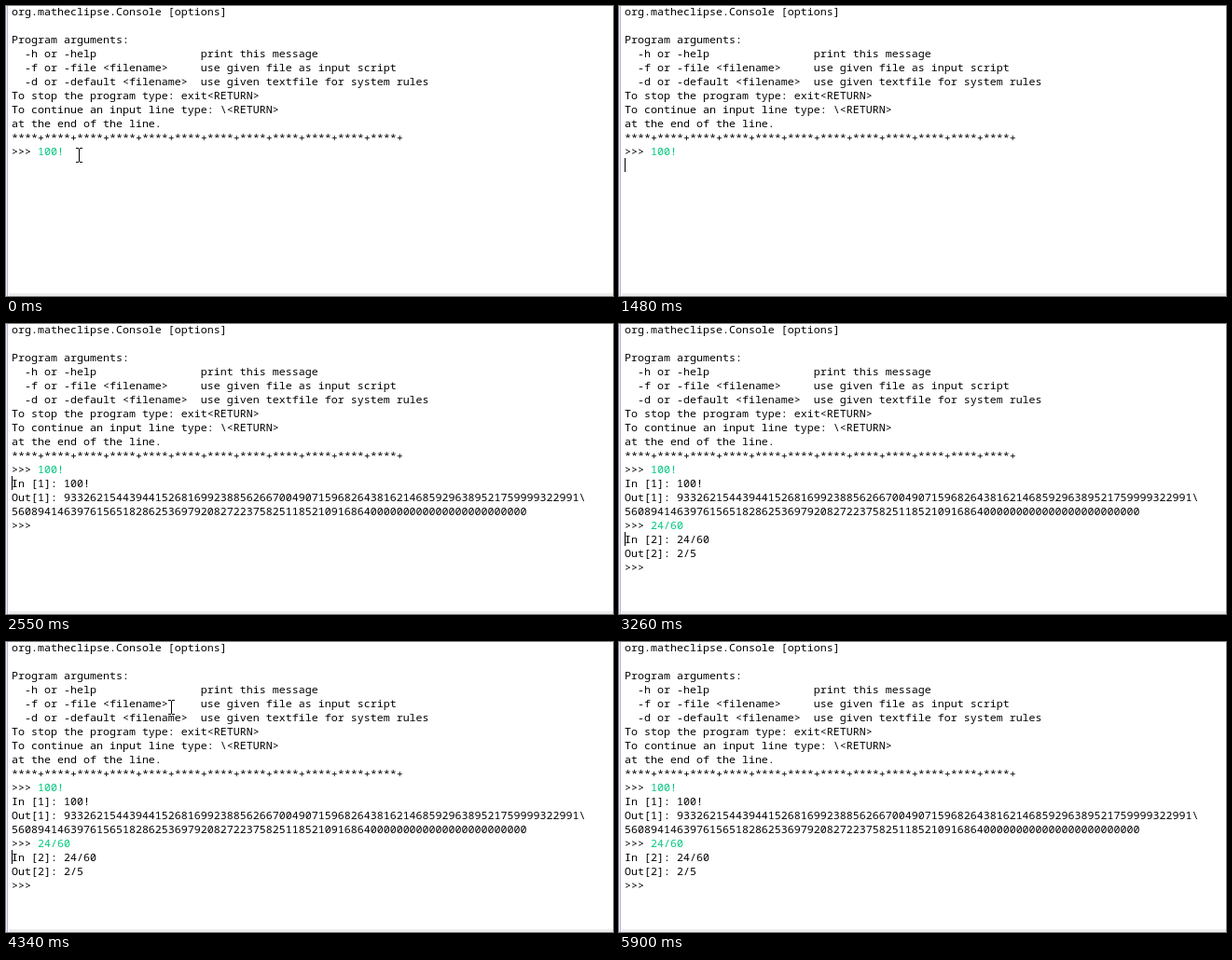
Animation of 651 by 311 pixels, one loop 8 s. Source, as an HTML page with a canvas:

```html
<!DOCTYPE html>
<html lang="en">
<head>
<meta charset="utf-8">
<title>Console</title>
<style>
  html, body { margin: 0; width: 100%; height: 100%; overflow: hidden; background: #fff; }
  canvas { display: block; }
</style>
</head>
<body>
<canvas id="stage" width="651" height="311"></canvas>
<script>
const ctx = document.getElementById('stage').getContext('2d', { alpha: false });
const LOOP = 8000, LEFT = 6, CELL = 7, LINE = 15;
const BLACK = '#000', GREEN = '#00c87d';

// Moments of the session
const ENTER = 1480, FIRST_OUT = 1600, SECOND_OUT = 3260, IDLE = 5900;
const BLINK = 523, BLINK_START = 150, POINTER_STEP = 120;

const intro = [
  'org.matheclipse.Console [options]',
  '',
  'Program arguments:',
  '  -h or -help                print this message',
  '  -f or -file <filename>     use given file as input script',
  '  -d or -default <filename>  use given textfile for system rules',
  'To stop the program type: exit<RETURN>',
  'To continue an input line type: \\<RETURN>',
  'at the end of the line.',
  '****+'.repeat(12),
  '>>>'
];

let product = 1n;
for (let n = 2n; n <= 100n; n++) product *= n;
const digits = String(product);

const firstResult = [
  'In [1]: 100!',
  'Out[1]: ' + digits.slice(0, 79) + '\\',
  digits.slice(79),
  '>>>'
];
const secondResult = ['In [2]: 24/60', 'Out[2]: 2/5', '>>>'];

// The pointer shows at start, glides from go to end, then hides or glides on
const glides = [
  { start: 0, go: 280, end: 670, from: [75, 152], to: [68, 152] },
  { start: 2280, go: 2280, end: 2430, from: [160, 226], to: [160, 226] },
  { start: 3570, go: 4220, end: 4580, hide: 4830, from: [177, 60], to: [167, 65] },
  { start: 4830, go: 4830, end: 5340, from: [166, 76], to: [10, 65] }
];

function rect(x, y, w, h, color) {
  ctx.fillStyle = color;
  ctx.fillRect(x, y, w, h);
}

function write(text, row, col = 0, color = BLACK) {
  ctx.fillStyle = color;
  ctx.fillText(text, LEFT + col * CELL, 10 + row * LINE);
}

function writeLines(lines, row) {
  lines.forEach((text, i) => write(text, row + i));
}

// Every move of the caret restarts its blinking
function drawCaret(t) {
  let since = BLINK_START, col = 8, row = 10;
  if (t >= ENTER) [since, col, row] = [ENTER, 0, 11];
  if (t >= SECOND_OUT) [since, col, row] = [SECOND_OUT, 0, 15];
  const lit = t >= since && t < IDLE && Math.floor((t - since) / BLINK) % 2 === 0;
  if (lit) rect(LEFT + col * CELL, row * LINE - 2, 1, LINE, BLACK);
}

function drawPointer(t) {
  const glide = glides.find(g => t >= g.start && t < (g.hide || g.end));
  if (!glide) return;
  const { go, end, from, to } = glide;
  const elapsed = Math.floor((t - go) / POINTER_STEP) * POINTER_STEP;
  const u = Math.min(1, Math.max(0, elapsed / (end - go)));
  const [x, y] = from.map((a, i) => Math.round(a + (to[i] - a) * u));
  for (const edge of [y, y + 15]) {
    rect(x, edge, 3, 1, BLACK);
    rect(x + 4, edge, 3, 1, BLACK);
  }
  rect(x + 3, y + 1, 1, 14, BLACK);
}

function draw(t) {
  rect(0, 0, 651, 311, '#fff');
  rect(0, 0, 1, 311, '#eeeef6');
  rect(1, 0, 1, 311, '#b4b4dc');
  rect(3, 308, 648, 3, '#ececec');

  ctx.font = '500 11.667px "Noto Sans Mono", "DejaVu Sans Mono", monospace';
  writeLines(intro, 0);
  write('100!', 10, 4, GREEN);
  if (t >= FIRST_OUT) writeLines(firstResult, 11);
  if (t >= SECOND_OUT) {
    write('24/60', 14, 4, GREEN);
    writeLines(secondResult, 15);
  }
  drawCaret(t);
  drawPointer(t);
}

const start = performance.now();
function tick() {
  draw((performance.now() - start) % LOOP);
  requestAnimationFrame(tick);
}
tick();
</script>
</body>
</html>
```
